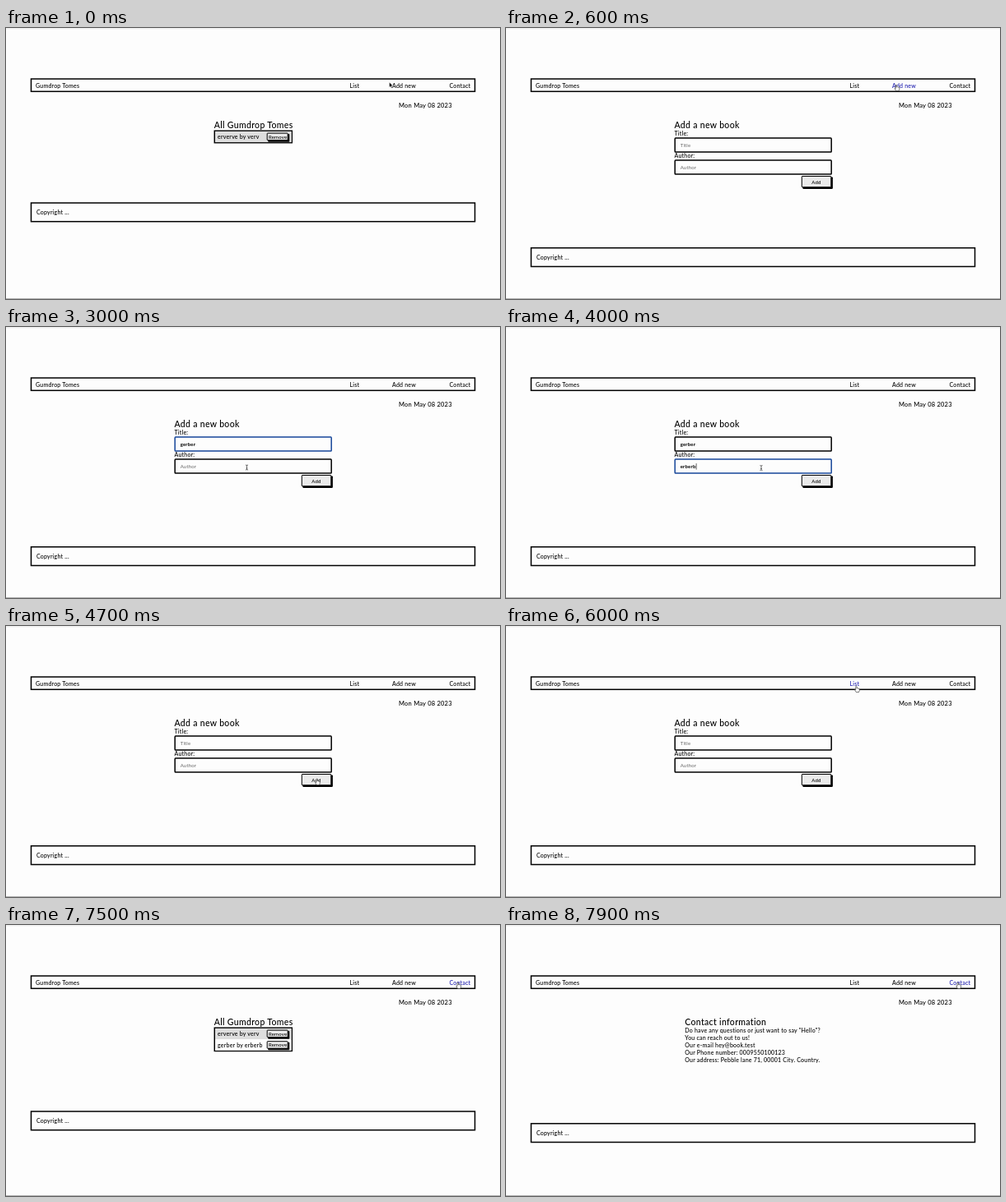
An HTML page for the animation above (8 s loop, 600 by 330 pixels).

```html
<!DOCTYPE html>
<html lang="en">
<head>
<meta charset="utf-8">
<title>Book list</title>
<style>
  html, body { margin: 0; width: 100%; height: 100%; overflow: hidden; background: #fdfdfd; }
  svg { display: block; width: 600px; height: 330px; }
  text { font: 500 7px Lato, "Open Sans", sans-serif; letter-spacing: .03em; fill: #000; white-space: pre; }
  .heading { font-size: 10.5px; }
  .date { font-size: 7.5px; }
  .small { font-size: 6px; }
  .typed { font-size: 6px; font-weight: 700; }
  .hint { fill: #666; font-weight: 400; }
  .hover { fill: #1c1cae; }
  .frame { fill: #fdfdfd; stroke: #000; stroke-width: 1.5; }
  .focus { stroke: #17479a; }
</style>
</head>
<body>
<svg id="stage" viewBox="0 0 600 330"></svg>
<script>
const LOOP = 8000, STEP = 100;
const stage = document.getElementById('stage');

function add(parent, tag, attrs, content = '') {
  const node = document.createElementNS('http://www.w3.org/2000/svg', tag);
  for (const key in attrs) node.setAttribute(key, attrs[key]);
  node.textContent = content;
  return parent.appendChild(node);
}
const group = (parent = stage) => add(parent, 'g', {});
const label = (parent, x, y, content, cls = '') => add(parent, 'text', { x, y, class: cls }, content);
const rect = (parent, x, y, width, height, attrs) => add(parent, 'rect', { x, y, width, height, ...attrs });
const box = (parent, x, y, w, h, attrs) => rect(parent, x, y, w, h, { class: 'frame', ...attrs });
const show = (node, on) => node.setAttribute('visibility', on ? 'visible' : 'hidden');

function button(parent, x, y, w, h, content, textX, textY) {
  rect(parent, x + 1, y + 1, w + .6, h + .6, { rx: .8 });
  rect(parent, x, y, w - .5, h - .5, { rx: .6, fill: '#ebebeb', stroke: '#000', 'stroke-width': 1 });
  label(parent, textX, textY, content, 'small');
}

// Shared page parts
rect(stage, 0, 0, 600, 1.5, { fill: '#f0f0f0' });
rect(stage, 0, 329, 600, 1, { fill: '#b4b4b4' });
box(stage, 30.5, 62, 539, 15.3);
label(stage, 36, 72.5, 'Gumdrop Tomes');
const links = {
  list: label(stage, 417.5, 72.5, 'List'),
  add: label(stage, 469, 72.5, 'Add new'),
  contact: label(stage, 538.5, 72.5, 'Contact'),
};
label(stage, 477, 97.2, 'Mon May 08 2023', 'date');
const footer = group();
box(footer, 30.5, 0, 539, 22.7);
label(footer, 37, 13.8, 'Copyright ...');

// Book list
const listPage = group();
label(listPage, 252.8, 121.5, 'All Gumdrop Tomes', 'heading');
const listFrame = box(listPage, 253.3, 125.2, 94, 14.5);
function bookRow(y, content, fill) {
  const row = group(listPage);
  rect(row, 254, y, 92.5, 13.2, { fill });
  label(row, 257, y + 9, content);
  button(row, 317.2, y + 2.2, 25.5, 9, 'Remove', 319, y + 8.7);
  return row;
}
bookRow(125.9, 'erverve by verv', '#dedede');
const newRow = bookRow(139.5, 'gerber by erberb', '#fdfdfd');

// Form
const formPage = group();
label(formPage, 204.5, 121.5, 'Add a new book', 'heading');
function field(y, name) {
  label(formPage, 204.5, y - 2.8, name + ':');
  return {
    name,
    frame: box(formPage, 205.2, y, 190, 17, { rx: .8 }),
    text: label(formPage, 211.7, y + 10.5, name),
    caret: rect(formPage, 0, y + 5, .6, 7.5),
  };
}
const title = field(134.1, 'Title');
const author = field(161.1, 'Author');
button(formPage, 359.3, 180.5, 36, 13.8, 'Add', 371.3, 189.6);

// Suggestions under the author field
const popup = group(formPage);
rect(popup, 212, 181, 78, 95.5, { rx: 3, fill: '#fff', stroke: '#d4d4d4', 'stroke-width': .7 });
['verv', 'erv', 'ververv', 'rverv', 'erver'].forEach((word, i) =>
  label(popup, 219, 194 + i * 18, word, 'small'));

// Contact
const contactPage = group();
label(contactPage, 217.3, 121.5, 'Contact information', 'heading');
['Do have any questions or just want to say "Hello"?',
 'You can reach out to us!',
 'Our e-mail hey@book.test',
 'Our Phone number: 0009550100123',
 'Our address: Pebble lane 71, 00001 City. Country.',
].forEach((line, i) => label(contactPage, 217.3, 131.2 + i * 9, line));

// Pointers
const outline = { stroke: '#fff', 'stroke-width': .5, 'stroke-linejoin': 'round' };
const pointers = {
  arrow: add(stage, 'path', { d: 'M0 0V6.2L1.5 5L2.5 7.2L3.6 6.7L2.6 4.6H4.5Z', ...outline }),
  hand: add(stage, 'path', {
    d: 'M-.7 .6Q0-.4.6.6V2.8Q1.4 2.2 1.8 3Q2.6 2.5 2.9 3.3Q3.8 3.1 3.8 4V5.4L3 7.6H-.2L-1.9 4.8Q-1.8 3.8-.7 4.5Z',
    fill: '#fff', stroke: '#222', 'stroke-width': .6, 'stroke-linejoin': 'round',
  }),
  beam: add(stage, 'path', {
    d: 'M-1.5-3Q0-3 0-2Q0-3 1.5-3M0-2V2.2M-1.5 3Q0 3 0 2.2Q0 3 1.5 3M-.8 1H.8',
    fill: 'none', stroke: '#333', 'stroke-width': .7,
  }),
};

// time, x, y, pointer
const path = [
  [0, 465.5, 66, 'arrow'], [100, 469, 68, 'hand'], [300, 474, 69, 'hand'], [600, 474, 69, 'hand'],
  [700, 470, 71, 'hand'], [800, 458, 82, 'arrow'], [1100, 370, 130, 'arrow'],
  [1200, 345, 142, 'beam'], [1400, 327.5, 148, 'beam'], [1800, 327.5, 148, ''],
  [2500, 313, 149, 'beam'], [2600, 309, 160, 'arrow'], [2700, 303, 172, 'beam'],
  [2800, 297, 183, 'arrow'], [2900, 293, 175, 'beam'], [3000, 292.5, 171, 'beam'], [3400, 292.5, 171, ''],
  [4000, 310, 171.5, 'beam'], [4200, 346, 180, 'arrow'], [4300, 366, 184, 'hand'],
  [4400, 377.5, 186, 'hand'], [5000, 377.5, 186, 'hand'], [5100, 382, 178, 'arrow'],
  [5400, 445, 88, 'arrow'], [5500, 450, 63, 'arrow'], [5600, 438, 66, 'arrow'],
  [5700, 426.5, 72, 'hand'], [5900, 426.5, 72, 'hand'], [6000, 425.5, 73, 'hand'],
  [6200, 429, 72, 'hand'], [6300, 431.8, 72, 'arrow'], [6800, 431.8, 72.3, 'arrow'],
  [6900, 442, 72, 'arrow'], [7100, 480, 70, 'hand'], [7200, 505, 71, 'arrow'],
  [7400, 541, 71, 'hand'], [7500, 548.8, 69.8, 'hand'],
];
const hovers = [[100, 800, 'add'], [5700, 6900, 'list'], [7100, 7200, 'add'], [7400, 8000, 'contact']];
const pages = [[0, 'list', 213], [600, 'form', 267.8], [6100, 'list', 227], [7700, 'contact', 241.8]];
const titleTyping = [[0, ''], ...[...'gerber'].map((_, i) => [1800 + i * 100, 'gerber'.slice(0, i + 1)]), [4600, '']];
const authorTyping = [[0, ''], [3400, 'erb'], [3600, 'erber'], [3700, 'erberb'], [4600, '']];

const latest = (steps, t) => steps.findLast(step => step[0] <= t);
const within = (t, from, to) => t >= from && t < to;

function drawField(input, value, focused, caretOn) {
  input.text.textContent = value || input.name;
  input.text.setAttribute('class', value ? 'typed' : 'small hint');
  input.frame.setAttribute('class', focused ? 'frame focus' : 'frame');
  const caretVisible = focused && caretOn && value;
  if (caretVisible) input.caret.setAttribute('x', 212 + input.text.getComputedTextLength());
  input.caret.setAttribute('opacity', caretVisible ? 1 : 0);
}

function drawPointer(t) {
  const index = path.findLastIndex(key => key[0] <= t);
  const [start, x, y, kind] = path[index];
  const next = path[index + 1];
  // Gaps longer than 300 ms are rests
  const moving = next && next[0] - start <= 300;
  const k = moving ? (t - start) / (next[0] - start) : 0;
  const px = moving ? x + (next[1] - x) * k : x;
  const py = moving ? y + (next[2] - y) * k : y;
  for (const name in pointers) show(pointers[name], name === kind);
  if (kind) pointers[kind].setAttribute('transform', `translate(${px} ${py})`);
}

function draw(now) {
  const t = Math.floor((now % LOOP) / STEP) * STEP;
  const [, page, footerY] = latest(pages, t);
  listPage.style.display = page === 'list' ? '' : 'none';
  formPage.style.display = page === 'form' ? '' : 'none';
  contactPage.style.display = page === 'contact' ? '' : 'none';
  footer.setAttribute('transform', `translate(0 ${footerY})`);

  const secondBook = t >= 6100;
  newRow.style.display = secondBook ? '' : 'none';
  listFrame.setAttribute('height', secondBook ? 28.2 : 14.5);

  for (const name in links) {
    const on = hovers.some(([from, to, link]) => link === name && within(t, from, to));
    links[name].setAttribute('class', on ? 'hover' : '');
  }
  drawField(title, latest(titleTyping, t)[1], within(t, 1700, 3200), t < 2800);
  drawField(author, latest(authorTyping, t)[1], within(t, 3200, 4600), t < 4200);
  popup.style.display = within(t, 3200, 3400) ? '' : 'none';
  drawPointer(t);
}

const began = performance.now();
function tick() {
  draw(performance.now() - began);
  requestAnimationFrame(tick);
}
tick();
</script>
</body>
</html>
```
